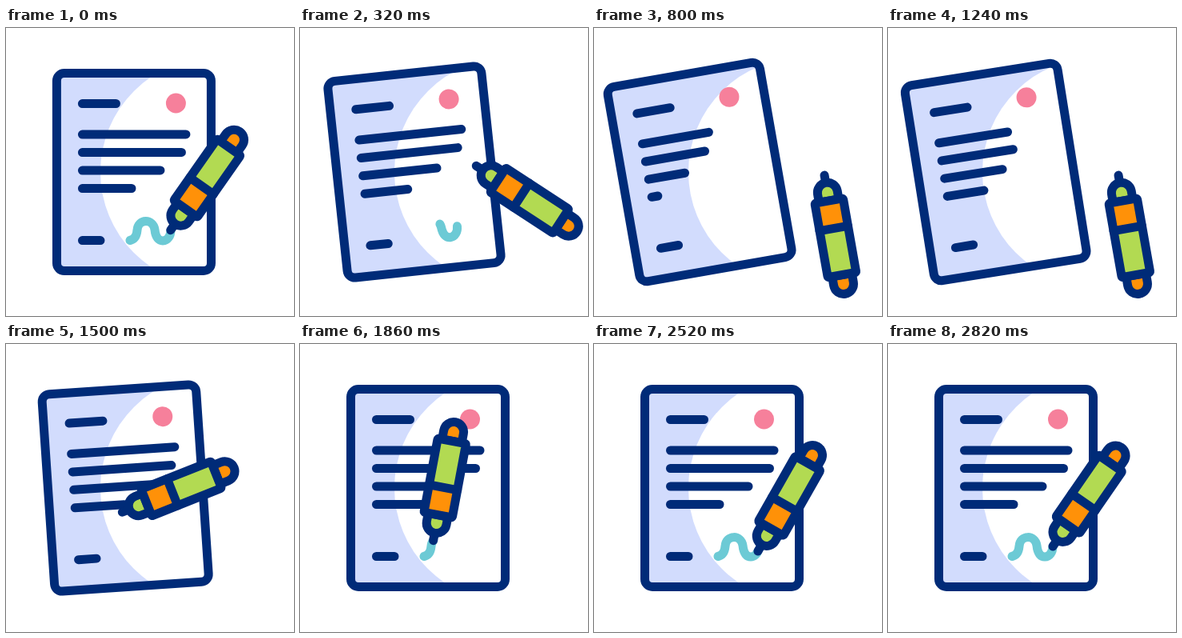
Animation, 360 px wide and 360 px high, one loop 3600 ms. Source, as an HTML page:

```html
<!DOCTYPE html>
<html lang="en">
<head>
<meta charset="utf-8">
<title>Signing a document</title>
<style>
  html, body { margin: 0; width: 100%; height: 100%; overflow: hidden; background: #fff; }
  svg { display: block; width: 100vw; height: 100vh; }
  .ink { stroke: #002b78; stroke-width: 11; stroke-linecap: round; stroke-linejoin: round; fill: none; }
  .green { fill: #b2da52; }
  .orange { fill: #ff9108; }
  #sign { fill: none; stroke: #6ccad5; stroke-width: 11; stroke-linecap: round; }
</style>
</head>
<body>
<svg viewBox="0 0 360 360">
  <rect class="sheet" x="63.5" y="56.5" width="193" height="247" rx="9.5" fill="#d2dcfd"/>
  <!-- the white disc stays put while the sheet swings beneath it -->
  <circle cx="261" cy="180" r="143" fill="#fff"/>
  <g class="sheet">
    <rect class="ink" x="63.5" y="56.5" width="193" height="247" rx="9.5"/>
    <circle cx="212.5" cy="94" r="12.5" fill="#f6809b"/>
    <g class="ink">
      <path d="M95.5 94.5H137.5M95.5 265.5H118"/>
      <line class="row" x1="95.5" y1="133" x2="225" y2="133"/>
      <line class="row" x1="95.5" y1="155.5" x2="219.5" y2="155.5"/>
      <line class="row" x1="95.5" y1="178" x2="193" y2="178"/>
      <line class="row" x1="95.5" y1="200.5" x2="157" y2="200.5"/>
    </g>
    <path id="sign" d="M155 265.5C162 264 163.5 258 164 253C165 238 184 238 186 252C187 262 191 266 196 266C202 266 206 260 206 253"/>
  </g>
  <!-- pen: writing point at the origin, barrel pointing up -->
  <g id="pen">
    <path class="ink" d="M0 0V-9"/>
    <path class="ink green" style="fill:#b2da52" d="M-12.5 -32.5V-22A12.5 12.5 0 0 0 12.5 -22V-32.5Z"/>
    <path class="ink" style="fill:#ff9108" d="M-12.5 -126.5V-138A12.5 12.5 0 0 1 12.5 -138V-126.5Z"/>
    <rect class="orange" x="-16" y="-67.5" width="32" height="33"/>
    <rect class="green" x="-16" y="-125" width="32" height="57.5"/>
    <rect class="ink" x="-18" y="-126.5" width="36" height="94" rx="1.5"/>
    <path class="ink" d="M-18 -67.5H18"/>
  </g>
</svg>
<script>
  const LOOP = 3600, RETURN = 1248, WRITE = 1690, DONE = 2820;
  const HALF = 69;                          // from the pen's point to its middle
  const REST = 34.7, AWAY = 170, START = 4; // pen angles

  const phase = (t, from, to) => Math.min(1, Math.max(0, (t - from) / (to - from)));
  const easeOut = u => u * (2 - u);
  const gentleOut = u => u * (3 - u) / 2;
  const easeInOut = u => (1 - Math.cos(Math.PI * u)) / 2;
  const mix = (a, b, u) => a + (b - a) * u;
  const arc = (a, b, c, u) => mix(mix(a, b, u), mix(b, c, u), u);

  const sheets = document.querySelectorAll('.sheet');
  const rows = [...document.querySelectorAll('.row')].map(el => ({ el, end: +el.getAttribute('x2') }));
  const sign = document.getElementById('sign');
  const pen = document.getElementById('pen');
  const signLength = sign.getTotalLength();

  // Moves a point along the pen's axis.
  function slide({ x, y }, angle, d) {
    const a = angle * Math.PI / 180;
    return { x: x + d * Math.sin(a), y: y - d * Math.cos(a) };
  }

  const rest = slide(sign.getPointAtLength(signLength), REST, HALF);
  const start = slide(sign.getPointAtLength(0), START, HALF);
  const away = { x: 300, y: 252 };

  // Flight of the pen's middle along a curve, turning as it goes.
  function fly(from, bend, to, angle0, angle1, u) {
    const angle = mix(angle0, angle1, u);
    const middle = { x: arc(from.x, bend.x, to.x, u), y: arc(from.y, bend.y, to.y, u) };
    return { tip: slide(middle, angle, -HALF), angle };
  }

  function penPose(t) {
    if (t < RETURN) return fly(rest, { x: 266, y: 174 }, away, REST, AWAY, easeOut(phase(t, 0, 780)));
    if (t < WRITE) return fly(away, { x: 220, y: 154 }, start, AWAY, START, easeInOut(phase(t, RETURN, WRITE)));
    const u = phase(t, WRITE, DONE);
    return {
      tip: sign.getPointAtLength(easeOut(u) * signLength),
      angle: mix(START, REST, gentleOut(u))
    };
  }

  function drawSign(from, to) {
    const size = (to - from) * signLength;
    sign.style.visibility = size > .1 ? 'visible' : 'hidden';
    sign.setAttribute('stroke-dasharray', `${size} 400`);
    sign.setAttribute('stroke-dashoffset', -from * signLength);
  }

  function render(t) {
    const swing = easeOut(phase(t, 0, 860)) - easeInOut(phase(t, 1100, 1800));
    sheets.forEach(s => s.setAttribute('transform',
      `translate(${-28 * swing}) rotate(${-10 * swing} 160 180)`));

    // the rows shorten from the bottom up, then grow back
    rows.forEach(({ el, end }, i) => {
      const local = t - 40 * (rows.length - 1 - i);
      const cut = easeInOut(phase(local, 140, 900)) - easeInOut(phase(local, 1000, 1370));
      el.setAttribute('x2', end - 56 * cut);
    });

    if (t < WRITE) drawSign(easeInOut(phase(t, 0, 620)), 1);
    else drawSign(0, easeOut(phase(t, WRITE, DONE)));

    const { tip, angle } = penPose(t);
    pen.setAttribute('transform', `translate(${tip.x} ${tip.y}) rotate(${angle})`);
  }

  function tick() {
    render(performance.now() % LOOP);
    requestAnimationFrame(tick);
  }
  tick();
</script>
</body>
</html>
```
